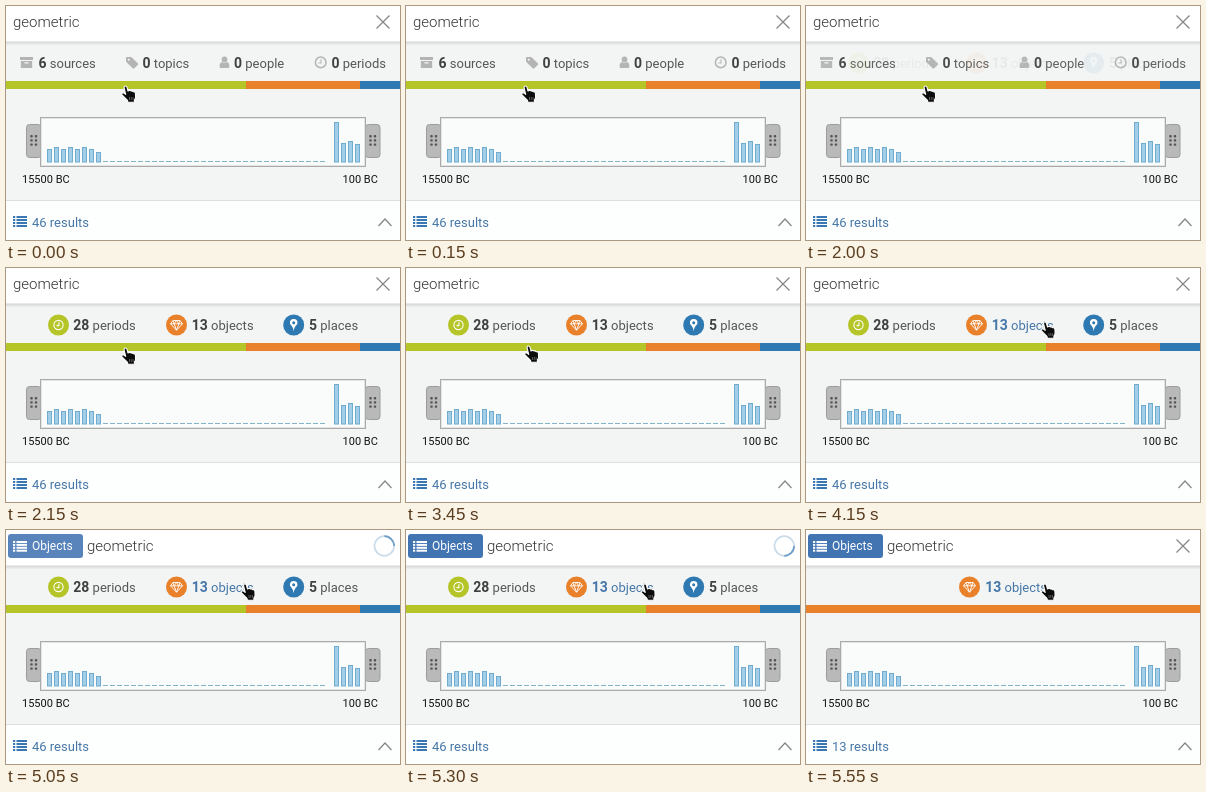
Write an HTML page that moves like this. It is 394 px wide and 234 px high and loops after 7950 ms.

```html
<!DOCTYPE html>
<html lang="en">
<head>
<meta charset="utf-8">
<title>Search facets</title>
<style>
  html, body { margin: 0; width: 100%; height: 100%; overflow: hidden; background: #f3f5f5; }
  svg { display: block; width: 394px; height: 234px; font: 13px Roboto, sans-serif; fill: #555; }
  .count { font-size: 14px; font-weight: 600; fill: #404040; }
  .link, .link .count { fill: #4677a8; }
  .query { font-size: 15px; font-weight: 300; fill: #333; }
  .axis { font-size: 11px; fill: #111; }
  .muted { fill: #b4b4b4; }
  .line { fill: none; stroke: #858585; stroke-width: 1.2; }
  .white { fill: none; stroke: #fff; stroke-width: 1.1; stroke-linejoin: round; }
</style>
</head>
<body>
<svg id="stage" viewBox="0 0 394 234" xmlns="http://www.w3.org/2000/svg"></svg>
<script>
const LOOP = 7950, STEP = 50;
const GREEN = '#b5c427', ORANGE = '#e9812a', BLUE = '#2e79b1';

const rect = (x, y, w, h, fill, extra = '') =>
  `<rect x="${x}" y="${y}" width="${w}" height="${h}" fill="${fill}" ${extra}/>`;
const path = (d, extra = '') => `<path d="${d}" ${extra}/>`;
const at = (x, y, body, extra = '') => `<g transform="translate(${x} ${y})" ${extra}>${body}</g>`;
const range = (n, f) => Array.from({ length: n }, (_, i) => f(i)).join('');

const stat = (x, count, word, id = '') =>
  `<text x="${x}" y="62" ${id}><tspan class="count">${count}</tspan> ${word}</text>`;
const listIcon = (x, y, fill, rows, gap) => range(rows, i =>
  rect(x, y + i * gap, 2.2, 2, fill) + rect(x + 3.5, y + i * gap, 10.5, 2, fill));

const glyphs = {
  clock: path('M4.6 0A4.6 4.6 0 1 1-4.6 0A4.6 4.6 0 1 1 4.6 0M.4-2.7V.6H-2', 'class="white" stroke-width="1.4"'),
  gem: path('M-3.5-4.5H3.5L6-1.2L0 5.2L-6-1.2ZM-6-1.2H6M-3.5-4.5L-2.4-1.2L0 5.2L2.4-1.2L3.5-4.5M-2.4-1.2L0-4.5L2.4-1.2', 'class="white" style="stroke-width:.9"'),
  pin: path('M0 6.2C-1-.1-3.8.4-3.8-2.2A3.8 3.8 0 0 1 3.8-2.2C3.8.4 1-.1 0 6.2ZM1.5-2.2A1.5 1.5 0 1 0-1.5-2.2A1.5 1.5 0 1 0 1.5-2.2', 'fill="#fff" fill-rule="evenodd"')
};
const badge = (x, color, glyph) => at(x, 57, `<circle r="10.5" fill="${color}"/>${glyphs[glyph]}`);

const grayIcons = `<g class="muted">
  ${path('M14 51H27V54H14ZM14.8 55H26.2V62H14.8ZM18.5 56.2V57.4H22.5V56.2Z', 'fill-rule="evenodd"')}
  ${path('M120 51.6Q120 51 120.8 51H125.2L132 57.5Q132.5 58.2 132 58.8L128 62.4Q127.3 62.8 126.7 62.2L120 55.8ZM123.8 53.7A1 1 0 1 0 121.8 53.7A1 1 0 1 0 123.8 53.7', 'fill-rule="evenodd"')}
  <circle cx="218.5" cy="53.5" r="2.9"/>
  ${path('M216 56Q218.5 58 221 56Q223.4 56.5 223.4 60.5Q223.4 62 222 62H215Q213.6 62 213.6 60.5Q213.6 56.5 216 56Z')}
  <circle cx="314.7" cy="56.4" r="5.3" fill="none" stroke="#b4b4b4" stroke-width="1.5"/>
  ${path('M315 53.3V57H312.5', 'fill="none" stroke="#b4b4b4" stroke-width="1.1"')}</g>`;

const histBar = (x, top) =>
  rect(x + .5, top + .5, 4, 155.5 - top, '#a3cee8', 'stroke="#70abd0"');
const handle = x => rect(x + .5, 118.5, 14.5, 33, '#b9b9b9', 'rx="3" stroke="#9c9c9c"') +
  range(6, i => rect(x + 4.3 + i % 2 * 4.5, 129 + (i >> 1) * 4.2, 2.4, 2.4, '#555', 'rx=".7"'));

const histogram = handle(20) + handle(359) +
  rect(34.5, 111.5, 325, 49, '#fafcfc', 'stroke="#aaa"') +
  rect(35.5, 112.5, 323, 47, 'none', 'stroke="#e3e5e5"') +
  [143, 141, 143, 141, 143, 141, 143, 146].map((top, i) => histBar(41 + i * 7, top)).join('') +
  path('M97 155.5H320', 'stroke="#83b5ca" stroke-dasharray="5 2"') +
  [116, 137, 135, 138].map((top, i) => histBar(328 + i * 7, top)).join('');

const hand = path('M0 1.5Q0 0 1.4 0Q2.7 0 3 1.4L4 5L5 4.5Q6.5 4 7.1 5.1Q8.5 4.5 9.3 5.8Q11 5.4 11.4 7L11.6 11Q11.5 13 10.4 14V16.3H3.9L3.5 14.5Q1 12-2.2 8.7Q-2.7 7.1-1.2 6.8Q.5 7 1.7 8.4Z',
  'fill="#0c0c0c" stroke="#fff" stroke-width="1.1" stroke-linejoin="round"') +
  path('M5.5 11V14M7.3 11V14M9.1 11V14', 'stroke="#888" stroke-width=".6"');

document.getElementById('stage').innerHTML = `
  <defs><linearGradient id="shade" x2="0" y2="1">
    <stop stop-color="#d2d4d4"/><stop offset="1" stop-color="#f3f5f5"/></linearGradient></defs>
  ${rect(0, 0, 394, 234, '#f3f5f5')}
  ${rect(0, 0, 394, 36, '#fff')}${rect(0, 35.5, 394, 4, 'url(#shade)')}
  ${rect(0, 194, 394, 40, '#fdfefe')}${rect(0, 194, 394, 1, '#dcdfdf')}
  <g id="tag">${rect(2, 4, 75, 24, '#4274b2', 'rx="3"')}${listIcon(7, 11, '#fff', 4, 2.9)}
    <text x="26" y="20" font-size="12" fill="#fff">Objects</text></g>
  <text id="query" class="query" y="21">geometric</text>
  ${path('M370.5 9.5L383.5 22.5M383.5 9.5L370.5 22.5', 'id="clear" class="line"')}
  <g id="spinner"><g fill="none" stroke-width="1.7">
    <circle cx="378.3" cy="16" r="9.8" stroke="#cbdcea"/>
    ${path('M378.3 6.2A9.8 9.8 0 0 1 388.1 16', 'id="arc" stroke="#6f9fca"')}</g></g>
  <g id="sources">${grayIcons}${stat(32.5, 6, 'sources')}${stat(136.5, 0, 'topics')}
    ${stat(228, 0, 'people')}${stat(325.5, 0, 'periods')}</g>
  <g id="facets">${badge(52.5, GREEN, 'clock')}${stat(67.3, 28, 'periods')}
    ${badge(170.5, ORANGE, 'gem')}${stat(185.8, 13, 'objects', 'id="objects"')}
    ${badge(287.7, BLUE, 'pin')}${stat(303, 5, 'places')}</g>
  <g id="filtered">${badge(163.5, ORANGE, 'gem')}${stat(179.2, 13, 'objects', 'class="link"')}</g>
  ${rect(0, 75, 394, 8, ORANGE)}
  <rect id="green" y="75" height="8" fill="${GREEN}"/>
  <rect id="blue" y="75" height="8" fill="${BLUE}"/>
  ${histogram}
  <g class="axis"><text x="16" y="177">15500 BC</text><text x="336.6" y="177">100 BC</text></g>
  ${listIcon(7, 210, '#3b78b3', 4, 3)}
  <text id="results" class="link" x="26" y="221"></text>
  ${path('M372.5 220L379 213L385.5 220', 'class="line"')}
  <g id="cursor">${at(.7, 1, hand, 'opacity=".18"')}${hand}</g>`;

const el = Object.fromEntries([...document.querySelectorAll('#stage [id]')].map(e => [e.id, e]));
const set = (id, name, value) => el[id].setAttribute(name, value);
const fade = (id, value) => set(id, 'opacity', value);
const progress = (t, start, end) => Math.min(1, Math.max(0, (t - start) / (end - start)));

// time, x, y of the pointing fingertip
const track = [[3400, 118, 80], [3450, 121, 78], [3600, 149, 73.5], [3800, 195.5, 65.5],
  [3950, 222, 59], [4050, 233, 55.5], [4150, 237.5, 54]];

function pointer(t) {
  const next = track.findIndex(key => key[0] > t);
  if (next === 0) return track[0].slice(1);
  if (next < 0) return track[track.length - 1].slice(1);
  const a = track[next - 1], b = track[next], p = progress(t, a[0], b[0]);
  return [a[1] + (b[1] - a[1]) * p, a[2] + (b[2] - a[2]) * p];
}

function render(t) {
  const swap = progress(t, 1990, 2150);
  const filter = progress(t, 5350, 5550);
  const tagged = t >= 5050, loaded = t >= 5400, loading = tagged && !loaded;

  fade('sources', 1 - swap);
  fade('facets', swap * (1 - filter));
  fade('filtered', filter);
  set('objects', 'class', t >= 3850 ? 'link' : '');

  fade('tag', tagged ? .88 + .12 * progress(t, 5050, 5150) : 0);
  set('query', 'x', tagged ? 81 : 7);
  fade('clear', loading ? 0 : 1);
  fade('spinner', loading ? 1 : 0);
  set('arc', 'transform', `rotate(${(t - 5050) * .36} 378.3 16)`);

  set('green', 'width', 240 * (1 - filter));
  set('blue', 'x', 354 + 40 * filter);
  set('blue', 'width', 40 * (1 - filter));
  el.results.textContent = `${loaded ? 13 : 46} results`;
  set('cursor', 'transform', `translate(${pointer(t).join(' ')})`);
}

const start = performance.now();
function tick() {
  const t = (performance.now() - start) % LOOP;
  render(Math.floor(t / STEP) * STEP);
  requestAnimationFrame(tick);
}
tick();
</script>
</body>
</html>
```
